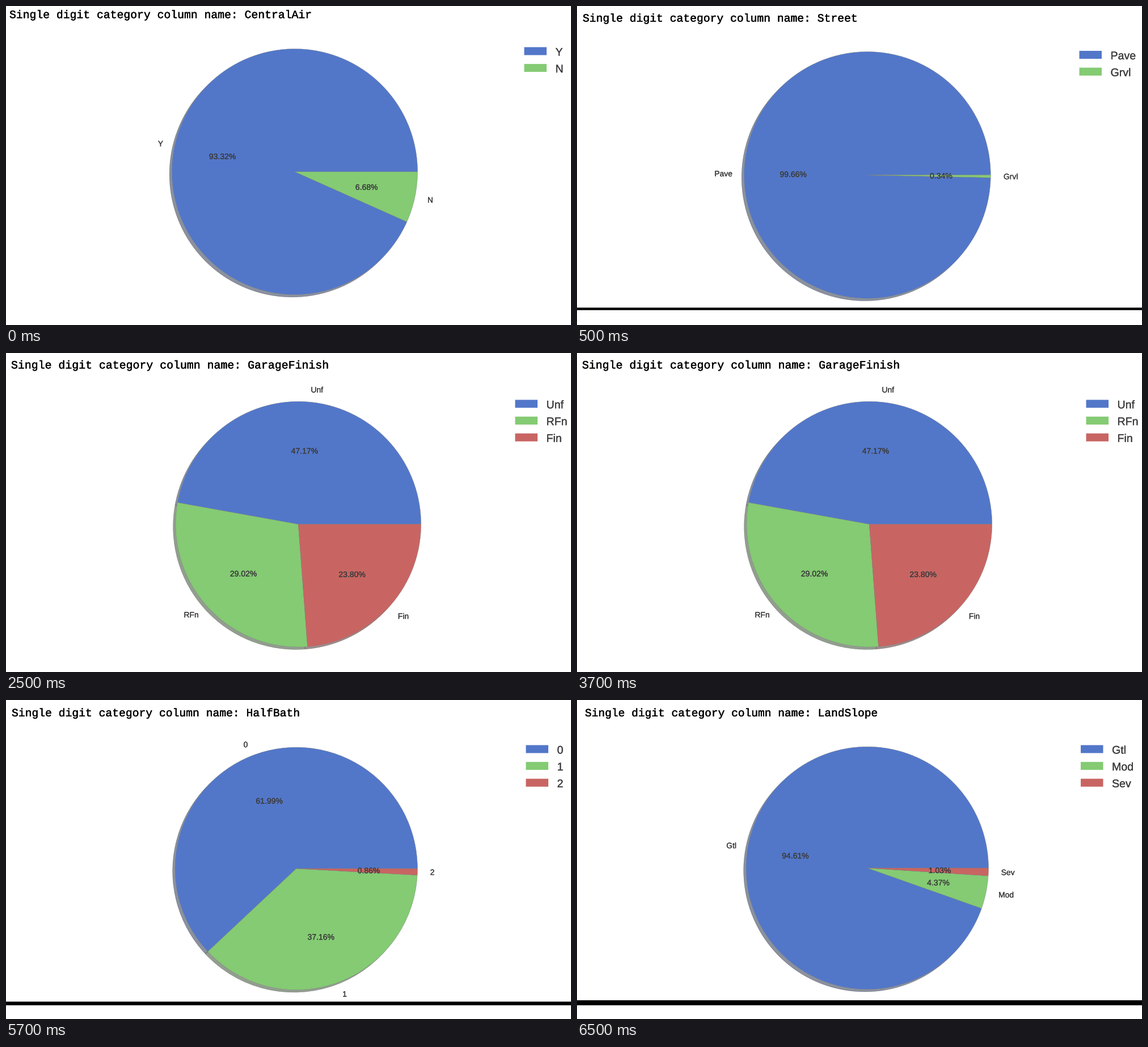
Write a matplotlib script that moves like this. It is 996 by 562 pixels and loops after 8000 ms.

```python
import math

import matplotlib.pyplot as plt
from matplotlib.animation import FuncAnimation
from matplotlib.patches import Rectangle, Wedge
from matplotlib.patheffects import withStroke

WIDTH, HEIGHT, DPI = 996, 562, 64  # this dpi gives exact pixel sizes
POINTS = 72 / DPI
STEP_MS = 500
COLORS = ["#5277c9", "#84cb73", "#c86562"]
INK = "#3c3c3c"
EDGE = "#808080"

# steps: how many 500 ms steps it stays; title: x, baseline, font size;
# pie: centre x, centre y, radius; legend: left, first row centre; bar: top, bottom
SCENES = [
    dict(steps=1, name="CentralAir", title=(6, 21.3, 19.74), pie=(509, 292, 216.5),
         shares={"Y": 93.32, "N": 6.68}, legend=(913.5, 79.5), bar=None),
    dict(steps=4, name="Street", title=(10, 27.5, 19.7), pie=(511.9, 297.8, 217.3),
         shares={"Pave": 99.66, "Grvl": 0.34}, legend=(885.5, 86), bar=(531.4, 535.8)),
    dict(steps=4, name="GarageFinish", title=(9, 27.3, 19.86), pie=(515.3, 301.7, 216.3),
         shares={"Unf": 47.17, "RFn": 29.02, "Fin": 23.80}, legend=(897.5, 89.5), bar=None),
    dict(steps=4, name="HalfBath", title=(10, 28.8, 19.69), pie=(511.7, 297, 213.7),
         shares={"0": 61.99, "1": 37.16, "2": 0.86}, legend=(916.5, 86.5), bar=(531.4, 537.8)),
    dict(steps=3, name="LandSlope", title=(14, 28.8, 19.55), pie=(511.7, 296, 213.7),
         shares={"Gtl": 94.61, "Mod": 4.37, "Sev": 1.03}, legend=(888, 86.5), bar=(529, 537.8)),
]
TIMELINE = [scene for scene in SCENES for _ in range(scene["steps"])]

plt.rcParams["text.hinting"] = "none"
fig = plt.figure(figsize=(WIDTH / DPI, HEIGHT / DPI), dpi=DPI, facecolor="white")
ax = fig.add_axes([0, 0, 1, 1])


def put_text(x, baseline, text, size, align="left", font="Liberation Sans",
             color=INK, weight=0.25):
    ax.text(x, baseline, text, fontsize=size * POINTS, family=font, color=color,
            ha=align, va="baseline", parse_math=False,
            path_effects=[withStroke(linewidth=weight * POINTS, foreground=color)])


def put_box(left, top, width, height, color):
    ax.add_patch(Rectangle((left, top), width, height, fc=color, lw=0, snap=False))


def shade(color):
    return tuple(0.3 * int(color[i:i + 2], 16) / 255 for i in (1, 3, 5))


def draw_pie(cx, cy, radius, shares):
    total = sum(shares.values())
    offset = 0.02 * radius
    angle = 0
    for (label, share), color in zip(shares.items(), COLORS):
        end = angle + 360 * share / total
        ax.add_patch(Wedge((cx - offset, cy + offset), radius, -end, -angle,
                           fc=shade(color), ec=shade(color), alpha=0.5,
                           lw=0.5 * POINTS, zorder=1))
        ax.add_patch(Wedge((cx, cy), radius, -end, -angle, fc=color,
                           ec=EDGE, lw=0.4 * POINTS, zorder=2))

        middle = math.radians((angle + end) / 2)
        dx, dy = radius * math.cos(middle), -radius * math.sin(middle)
        put_text(cx + 1.1 * dx + 1, cy + 1.1 * dy + 4.8, label, 13.9,
                 "left" if dx > 0 else "right")
        put_text(cx + 0.6 * dx - 0.4, cy + 0.6 * dy + 4.8, f"{share:.2f}%", 14, "center")
        angle = end


def draw_legend(left, top, labels):
    for row, (label, color) in enumerate(zip(labels, COLORS)):
        y = top + 29.6 * row
        put_box(left, y - 7, 39.5, 14, color)
        put_text(left + 55, y + 8, label, 19.6)


def draw(step):
    scene = TIMELINE[step % len(TIMELINE)]
    ax.clear()
    ax.set(xlim=(0, WIDTH), ylim=(HEIGHT, 0))
    ax.axis("off")

    x, baseline, size = scene["title"]
    put_text(x, baseline, "Single digit category column name: " + scene["name"],
             size, font="Liberation Mono", color="black", weight=0.4)
    draw_pie(*scene["pie"], scene["shares"])
    draw_legend(*scene["legend"], scene["shares"])
    if scene["bar"]:
        top, bottom = scene["bar"]
        put_box(0, top, WIDTH, bottom - top, "black")
    return ax.get_children()


animation = FuncAnimation(fig, draw, frames=len(TIMELINE), init_func=lambda: draw(0),
                          interval=STEP_MS, repeat=True, repeat_delay=0, blit=False)
plt.show()
```
